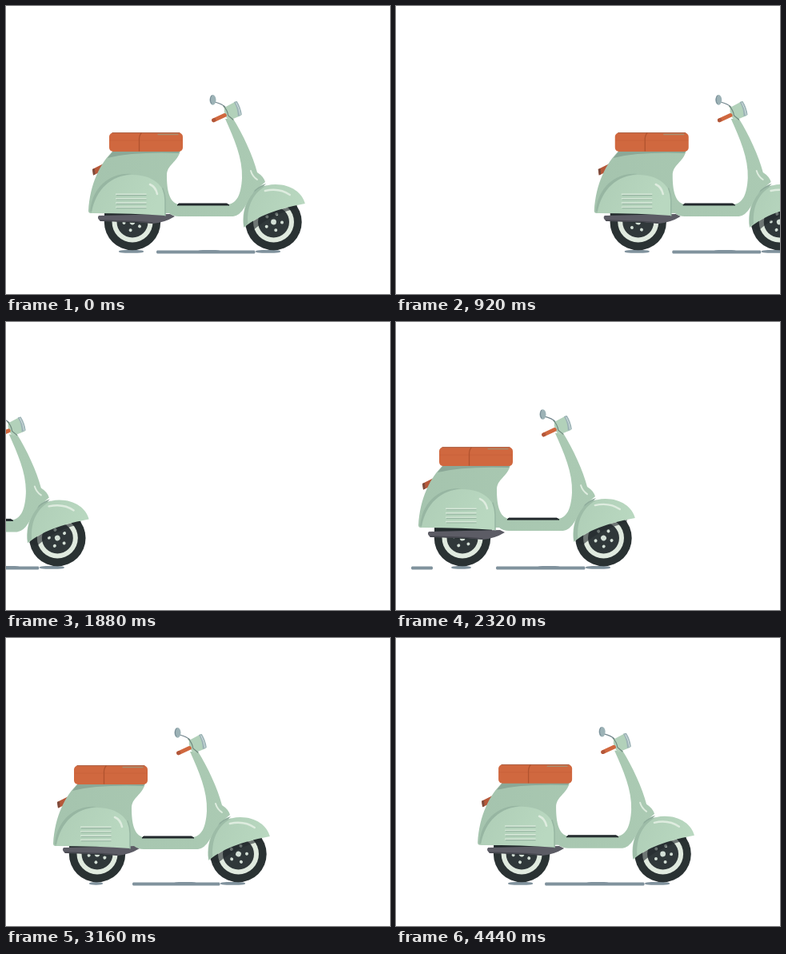
These frames come from a looping animation (480x360 px, 4.48 s). An HTML page:

```html
<!DOCTYPE html>
<html lang="en">
<head>
<meta charset="utf-8">
<title>Scooter</title>
<style>
  html, body { margin: 0; width: 100%; height: 100%; overflow: hidden; background: #fff; }
  svg { display: block; width: 480px; height: 360px; }
  .line { fill: none; stroke-linecap: round; }
  .shine { stroke: #deecdf; }
</style>
</head>
<body>
<svg viewBox="0 0 480 360">
  <defs>
    <linearGradient id="paint" x1="0" y1="0" x2="1" y2="0">
      <stop offset="0" stop-color="#a5c4ae"/>
      <stop offset="1" stop-color="#abcab3"/>
    </linearGradient>
    <linearGradient id="panel" x1="0" y1="0" x2="1" y2="0.3">
      <stop offset="0" stop-color="#aecdb6"/>
      <stop offset="1" stop-color="#b9d8c0"/>
    </linearGradient>
    <g id="wheel">
      <circle r="35.2" fill="#2a3233"/>
      <circle r="25.5" fill="#e0eadf"/>
      <circle r="19.5" fill="#30383a"/>
    </g>
  </defs>

  <g id="ground" fill="#80929d"></g>
  <circle id="puff" fill="#d3e6d8"/>

  <g id="scooter">
    <g id="rear" transform="translate(158 270)"><use href="#wheel"/><g class="bolts" fill="#d3dfd6"></g></g>
    <g id="front" transform="translate(334.5 270)"><use href="#wheel"/><g class="bolts" fill="#d3dfd6"></g></g>

    <g id="exhaust">
      <path d="M123 257H195V269Q158 274 123 267Z" fill="#232b2d"/>
      <path d="M116 262L205 260L211 263Q198 271 183 272L164 270L118 269Q113 265 116 262Z" fill="#5c5c65"/>
      <path d="M118 268L164 269.5L183 271" class="line" stroke="#46474f" stroke-width="1.3"/>
    </g>

    <g id="body">
      <path d="M299 276C318 260 345 253 364 249L363 253C345 257 325 266 308 281Z" fill="#232b2d" opacity=".6"/>
      <path d="M108 204L122 197L117 208L109 211.5Z" fill="#b65839"/>
      <path d="M108 204L111 203L111.5 210.5L109 211.5Z" fill="#7d4a3c"/>

      <path fill="url(#paint)" d="M134 181C118 196 105 222 103 256Q103 259 106 259L204 259Q209 263 216 263L284 263Q292 262 298 252L311 231L324 220Q322 213 314 208C309 188 296 160 284 141L274 141C285 166 296 190 295 215C294 236 288 248 276 248L216 248C204 246 201 230 201 212C201 198 214 196 218 181Z"/>
      <path d="M134 181H217L216 184Q160 182 127 190Z" fill="#8ba897"/>
      <path d="M216 247H276L279 249H214Z" fill="#22292c" stroke="#22292c" stroke-width="1"/>
      <path d="M105 257C108 226 130 208 157 210C140 212 122 226 116 258Z" fill="#97b6a2"/>
      <path d="M107 258C112 229 132 211 158 211C184 211 199 225 199 243L199 262Q160 259 107 259Z" fill="url(#panel)"/>
      <path d="M196 228Q199 236 199 243V262" class="line" stroke="#97b6a2" stroke-width="1.5"/>
      <g id="vents"></g>
      <path d="M180 223Q187 226 189 235" class="line shine" stroke-width="2.6"/>

      <rect x="129" y="158.5" width="92" height="23.5" rx="5" fill="#d0683f"/>
      <path d="M130 168H220" class="line" stroke="#c9623b" stroke-width="1"/>
      <path d="M133 158.6H217" class="line" stroke="#a95d40" stroke-width="1"/>
      <path d="M169 159Q166 162 166.5 170V181" class="line" stroke="#b0532f" stroke-width="1.3"/>
      <path d="M190 160.5H215" class="line" stroke="#a79072" stroke-width="1.3"/>

      <path d="M300 250L311 230Q318 224 325 222L312 236Z" fill="#8eac9b"/>
      <path d="M306 206Q308 213 314 217" class="line shine" stroke-width="2"/>
      <g transform="translate(.8 0)">
        <path d="M296.5 277C292 249 307 223 336 223C356 223 370 234 373 247C347 252 318 259 296.5 277Z" fill="url(#panel)"/>
        <path d="M296.5 276C294 249 306 228 326 224C309 232 300 249 301.5 272Z" fill="#9dbca7"/>
        <path d="M323 231Q341 227 354 236" class="line shine" stroke-width="2.4"/>

        <path d="M260 120Q269 122 274 127" class="line" stroke="#72858d" stroke-width="1.2"/>
        <ellipse cx="257.7" cy="117.4" rx="4" ry="6.3" fill="#9cb2b6"/>
        <path d="M256 112Q253 117 256 122" class="line" stroke="#758a94" stroke-width="1"/>
        <path d="M272 127L287 119Q292 127 293 137L278 143Q271 137 272 127Z" fill="#b2d1ba"/>
        <path d="M284 120L288 119Q293 127 294 136L289 138Q289 128 284 120Z" fill="#9cb3b6"/>
        <path d="M287 121Q291 128 292 136" class="line" stroke="#d4e1e2" stroke-width="1"/>
        <path d="M271 125Q276 130 277 137L283 142" class="line" stroke="#71897f" stroke-width="1.2"/>
        <path d="M259 142.7L272.5 136.5" class="line" stroke="#d0683f" stroke-width="5"/>
        <path d="M258.6 142.9L259.4 142.5" class="line" stroke="#b2573a" stroke-width="4.6"/>
      </g>
    </g>
  </g>
</svg>

<script>
const LOOP = 4480, STEP = 40, RADIUS = 33;
const $ = s => document.querySelector(s);

// [ms, horizontal offset]: riding off to the right, then returning from the left
const leave = [[-480, -20], [-40, -0.9], [0, 0], [300, 14], [560, 46], [600, 55], [1120, 204], [1240, 239.4], [1700, 386]];
const enter = [[1760, -380], [1900, -255], [2080, -149], [2320, -75], [2560, -52], [2880, -45.5],
  [3160, -44], [3440, -40], [3800, -30], [4000, -20], [4440, -0.9], [4480, 0]];
const bob = [[0, 0], [600, -1.7], [1240, 1.7], [2320, -1.9], [3160, 1], [3800, -1.8], [4440, -0.2], [4480, 0]];
const streakStart = [[0, 188], [600, 181], [1240, 220], [2320, 200], [3160, 202], [3800, 190], [4440, 187], [4480, 188]];

// Smooth monotone interpolation through a table of [time, value]
function follow(table, t) {
  const last = table.length - 2;
  let i = 0;
  while (i < last && t >= table[i + 1][0]) i++;
  const slope = k => (table[k + 1][1] - table[k][1]) / (table[k + 1][0] - table[k][0]);
  const tangent = k => {
    if (k === 0) return slope(0);
    if (k > last) return slope(last);
    const a = slope(k - 1), b = slope(k);
    return a * b > 0 ? 2 * a * b / (a + b) : 0;
  };
  const [t0, v0] = table[i], [t1, v1] = table[i + 1];
  const d = t1 - t0, u = Math.min(1, Math.max(0, (t - t0) / d)), w = 1 - u;
  return v0 * (1 + 2 * u) * w * w + v1 * u * u * (3 - 2 * u)
    + d * u * w * (tangent(i) * w - tangent(i + 1) * u);
}

function add(parent, tag, attrs) {
  const node = document.createElementNS("http://www.w3.org/2000/svg", tag);
  for (const k in attrs) node.setAttribute(k, attrs[k]);
  return parent.appendChild(node);
}

for (let i = 0; i < 4; i++) {
  const y = 235.2 + i * 5.4;
  add($("#vents"), "path", { d: `M138 ${y + 1.4}H175.5`, stroke: "#97b5a2", "stroke-width": 1.1 });
  add($("#vents"), "path", { d: `M137 ${y}H175.5`, stroke: "#d6e7d8", "stroke-width": 1.4 });
}

document.querySelectorAll(".bolts").forEach(g => {
  add(g, "circle", { r: 3.4 });
  for (let i = 0; i < 5; i++) {
    const a = i * Math.PI * 2 / 5;
    add(g, "circle", { cx: 10.5 * Math.cos(a), cy: 10.5 * Math.sin(a), r: 2 });
  }
});

const ground = $("#ground");
const marks = [8, 1.2, 8, 6, 1.2].map(rx => add(ground, "rect", { rx, ry: 1.6 }));
function mark(i, left, right, top = 305.6, height = 3.8) {
  const m = marks[i];
  m.setAttribute("x", left);
  m.setAttribute("width", Math.max(0, right - left));
  m.setAttribute("y", top);
  m.setAttribute("height", height);
}

function drawGround(t, x) {
  const start = follow(streakStart, t);
  const shrink = 7.5 * Math.max(0, 1 - ((t - 2950) / 830) ** 2);
  ground.setAttribute("transform", `translate(${x} 0)`);
  mark(0, 141 + shrink, 172 - shrink, 305);
  mark(1, start, 311.5);
  mark(2, 312, 343, 305);
  mark(3, start + 52, start + 80, 305, 3);
  // Short streak trailing behind the rear wheel
  if (t >= 520 && t < 700) mark(4, 116, 133 - (t - 520) * 0.075);
  else if (t >= 2200 && t < 2440) mark(4, 94, 121 - Math.max(0, t - 2320) * 0.2);
  else mark(4, 0, 0);
}

function drawPuff(t, x) {
  const p = t % 1120;
  const grow = Math.min(1, Math.max(0, (p - 200) / 60));
  const fade = Math.min(1, Math.max(0, (640 - p) / 300));
  const puff = $("#puff");
  puff.setAttribute("cx", x + 84.5 - (p - 440) * 0.06);
  puff.setAttribute("cy", 255 - (p - 440) * 0.02);
  puff.setAttribute("r", 6 * grow * Math.sqrt(fade));
}

function draw(now) {
  const t = Math.floor(now % LOOP / STEP) * STEP;
  const x = t < 1720 ? follow(leave, t) : t < 1800 ? -400 : follow(enter, t);
  const turn = x / RADIUS * 180 / Math.PI;
  $("#scooter").setAttribute("transform", `translate(${x} 0)`);
  $("#body").setAttribute("transform", `translate(0 ${follow(bob, t)})`);
  $("#rear .bolts").setAttribute("transform", `rotate(${31 + turn})`);
  $("#front .bolts").setAttribute("transform", `rotate(${3 + turn})`);
  drawGround(t, x);
  drawPuff(t, x);
}

const begin = performance.now();
function tick() {
  draw(performance.now() - begin);
  requestAnimationFrame(tick);
}
tick();
</script>
</body>
</html>
```
